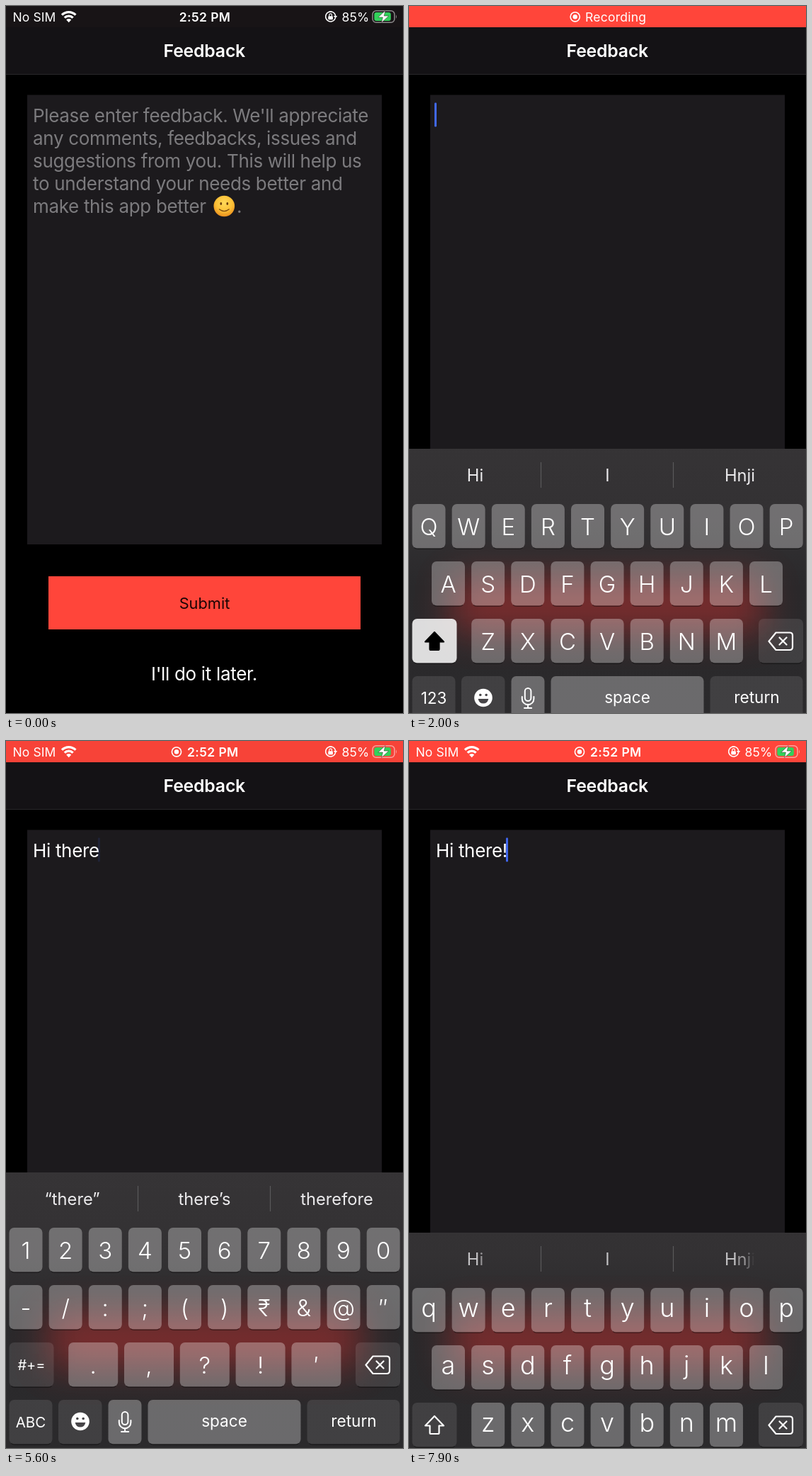
Recreate the animation shown at these times as an HTML page. Size 561 px wide and 998 px high, loop 8 s.

```html
<!DOCTYPE html>
<html lang="en">
<head>
<meta charset="utf-8">
<title>Feedback form</title>
<style>
html, body { margin: 0; width: 100%; height: 100%; overflow: hidden; background: #000; }
svg { display: block; width: 100vw; height: 100vh; }
text { font-family: Inter, Roboto, "Liberation Sans", sans-serif; fill: #fff; white-space: pre; }
.body { font-size: 26px; letter-spacing: -.33px; }
.hint { fill: #7c7b7e; }
.mid { text-anchor: middle; }
.status { font-size: 17.5px; letter-spacing: .1px; }
.bold { font-weight: 600; }
.clock { letter-spacing: .4px; }
.line { fill: none; stroke: #fff; stroke-linecap: round; stroke-linejoin: round; }
.item { transform-box: fill-box; transform-origin: center; }
</style>
</head>
<body>
<svg viewBox="0 0 561 998" preserveAspectRatio="none">
  <defs>
    <linearGradient id="base" gradientUnits="userSpaceOnUse" x1="0" y1="600" x2="0" y2="998">
      <stop offset="0" stop-color="#363436"/>
      <stop offset=".32" stop-color="#333133"/>
      <stop offset=".55" stop-color="#2a292b"/>
      <stop offset="1" stop-color="#2b2a2c"/>
    </linearGradient>
    <radialGradient id="smile" cx=".5" cy=".35" r=".65">
      <stop offset="0" stop-color="#ffd95a"/>
      <stop offset=".6" stop-color="#fbc036"/>
      <stop offset="1" stop-color="#ea8f1e"/>
    </radialGradient>
    <filter id="blur" x="-40%" y="-200%" width="180%" height="500%"><feGaussianBlur stdDeviation="26"/></filter>
    <clipPath id="boardClip"><rect id="boardEdge" width="561" height="998"/></clipPath>
  </defs>

  <rect width="561" height="998"/>
  <rect width="561" height="96" fill="#141215"/>
  <rect width="561" height="30" fill="#181416"/>
  <rect y="96" width="561" height="1" fill="#29282b"/>
  <text class="mid bold" x="280.3" y="71.5" font-size="24.8" letter-spacing="-.2">Feedback</text>

  <rect x="30" y="125.5" width="501" height="634.5" fill="#1c1a1d"/>
  <g id="hint">
    <g id="hintLines"></g>
    <circle cx="308.3" cy="282.5" r="14.8" fill="url(#smile)"/>
    <ellipse cx="303.8" cy="279" rx="1.4" ry="2.1" fill="#6b3d0c"/>
    <ellipse cx="312.8" cy="279" rx="1.4" ry="2.1" fill="#6b3d0c"/>
    <path d="M301.5 287q6.8 5.2 13.6 0" fill="none" stroke="#7a4810" stroke-width="1.4" stroke-linecap="round"/>
  </g>
  <text id="typed" class="body" x="38" y="164"></text>
  <rect id="caret" y="136.5" width="3" height="34" rx="1.2" fill="#4168f2"/>

  <rect x="60" y="805" width="441" height="75" fill="#ff453a"/>
  <text class="mid" x="280.5" y="851" font-size="21.8" style="fill:#1a0404">Submit</text>
  <text class="body mid" x="280" y="952">I'll do it later.</text>

  <g id="keyboard">
    <g clip-path="url(#boardClip)">
      <rect y="600" width="561" height="398" fill="url(#base)"/>
      <rect x="60" y="808" width="441" height="75" fill="#ff3230" opacity=".39" filter="url(#blur)"/>
    </g>
    <g id="board"></g>
  </g>

  <rect id="alert" width="561" height="30" fill="#ff453a"/>
  <g id="recIcon">
    <circle cy="15.3" r="6.6" class="line" stroke-width="1.6"/>
    <circle cy="15.3" r="3.2" fill="#fff"/>
  </g>
  <text id="recText" class="status" y="21.7" style="letter-spacing:.25px">Recording</text>
  <text id="clock" class="status bold mid clock" y="21.7">2:52 PM</text>
  <g id="sides">
    <text class="status item" x="9.5" y="21.7">No SIM</text>
    <g class="item">
      <path class="line" style="stroke-linecap:butt" stroke-width="3.3" d="M79 12.7A13.6 13.6 0 0 1 98.4 12.7M82.8 16.6A8.2 8.2 0 0 1 94.6 16.6"/>
      <path fill="#fff" d="M88.7 23.2L85.2 19.4A5 5 0 0 1 92.2 19.4Z"/>
    </g>
    <g class="item">
      <path class="line" stroke-width="1.5" d="M465.2 17.5A7 7 0 1 1 465.6 13.8"/>
      <path fill="#fff" d="M462.8 14H468.2L465.5 17.6Z"/>
      <rect x="455.3" y="14.2" width="6.6" height="5" rx="1" fill="#fff"/>
      <path class="line" stroke-width="1.2" d="M456.8 14V12.6A1.8 1.8 0 0 1 460.4 12.6V14"/>
    </g>
    <text class="status item" x="474.5" y="21.7">85%</text>
    <g class="item">
      <rect x="518" y="6.7" width="31" height="16.6" rx="5" fill="none" stroke="#fff" stroke-opacity=".5" stroke-width="1.5"/>
      <path d="M551 12.2Q553 15 551 17.8Z" fill="#fff" opacity=".5"/>
      <rect x="520.3" y="9" width="23.5" height="12" rx="3" fill="#32d15b"/>
      <path d="M536 6.5L525.8 16H532.4L530.6 23.5L540.8 14H534.2Z" fill="#fff" stroke="#2a1a1a" stroke-opacity=".6" stroke-width=".8"/>
    </g>
  </g>
</svg>

<script>
const LOOP = 8000, TRAVEL = 389, TOP = 609;
const SHOW = 1727, HIDE = 7853;
const $ = id => document.getElementById(id);
const clamp = v => Math.min(1, Math.max(0, v));
const ramp = (t, a, b) => clamp((t - a) / (b - a));
const smooth = (t, a, b) => { const u = ramp(t, a, b); return u * u * (3 - 2 * u); };
const attr = (el, values) => { for (const k in values) el.setAttribute(k, values[k]); };

// [press time, release time, key]
const presses = [
  [2400, 2490, 'H'], [2750, 2830, 'i'], [3410, 3500, ' '],
  [3780, 3870, 't'], [4040, 4130, 'h'], [4270, 4360, 'e'],
  [4560, 4670, 'r'], [4880, 4970, 'e'],
  [5480, 5560, '123'], [5810, 5905, '!'], [7100, 7180, 'ABC']
];
// [time, three suggestions]
const suggestions = [
  [0, 'Hi', 'I', 'Hnji'], [2490, '“H”', 'Hi', 'He'], [2830, '“Hi”', 'His', 'Hij'],
  [3500, 'there', 'I', 'how'], [3870, '“t”', 'the', 'to'], [4130, '“th”', 'the', 'that'],
  [4360, '“the”', 'there', 'there’s'], [4670, '“ther”', 'there', 'there’s'],
  [4970, '“there”', 'there’s', 'therefore'], [5905, 'Hi', 'I', 'Hnji'], [7830, 'Hi', 'I', 'Hnji']
];

const hints = ["Please enter feedback. We'll appreciate", 'any comments, feedbacks, issues and',
  'suggestions from you. This will help us', 'to understand your needs better and', 'make this app better'];
$('hintLines').innerHTML = hints.map((s, i) =>
  `<text class="body hint" x="38" y="${164 + 32 * i}">${s}</text>`).join('') +
  '<text class="body hint" x="326" y="292">.</text>';

// Keyboard: y is measured from the top edge of the keyboard
const keys = {};
const label = (x, y, size, s, extra = '') =>
  `<text class="mid" x="${x}" y="${y}" font-size="${size}" ${extra}>${s}</text>`;
const cap = (x, y, w, shade = .3, id = '') =>
  `<rect ${id && `id="${id}"`} x="${x}" y="${y}" width="${w}" height="62.5" rx="7" fill="#fff" fill-opacity="${shade}"/>` +
  `<path d="M${x + 3} ${y + 61.5}q2 1.7 5 1.7h${w - 16}q3 0 5-1.7" fill="none" stroke="#000" stroke-opacity=".4" stroke-width="1.5"/>`;
const escapeChar = c => c === '&' ? '&amp;' : c;

function row(chars, x, y, plane, w = 47, step = 56.13) {
  return [...chars].map((c, i) => {
    const kx = x + i * step, small = plane === 'lower';
    keys[plane + c] = { x: kx, y, w };
    return cap(kx, y, w) + label(kx + w / 2, y + (small ? 41 : 43.7), small ? 36 : 33, escapeChar(c), 'font-weight="360"');
  }).join('');
}

const arrow = (fill, stroke) =>
  `<path d="M36 259L49 272.5H42.5V282.5Q42.5 284 41 284H31Q29.5 284 29.5 282.5V272.5H23Z"
   fill="${fill}" stroke="${stroke}" stroke-width="2.2" stroke-linejoin="round"/>`;
const letters = (plane, rows, shift) => `<g id="${plane}">` +
  row(rows[0], 4.5, 78, plane) + row(rows[1], 32, 159, plane) + row(rows[2], 88.2, 240, plane) + shift + '</g>';

$('board').innerHTML =
  '<path d="M186.5 19v36M373.5 19v36" stroke="#5a595b" stroke-width="1.2"/>' +
  [93.5, 280.5, 467.5].map((x, i) => label(x, 46, 23.7, '', `id="word${i}" style="fill:#ecebed"`)).join('') +
  letters('upper', ['QWERTYUIOP', 'ASDFGHJKL', 'ZXCVBNM'], cap(4.5, 240, 63, .84) + arrow('#000', '#000')) +
  letters('lower', ['qwertyuiop', 'asdfghjkl', 'zxcvbnm'], cap(4.5, 240, 63, .1) + arrow('none', '#fff')) +
  '<g id="digits">' + row('1234567890', 4.5, 78, 'digits') + row('-/:;()₹&@″', 4.5, 159, 'digits') +
  row('.,?!′', 88.2, 240, 'digits', 70, 78.8) + cap(4.5, 240, 63, .1) + label(36, 279, 20, '#+=') + '</g>' +
  cap(494, 240, 63, .1) +
  '<path class="line" stroke-width="2.2" d="M518.5 259.5H538Q542 259.5 542 263.5V280Q542 284 538 284H518.5L508.5 271.8ZM523.5 266.5l10 10m0-10l-10 10"/>' +
  cap(4.5, 321, 61, .1, 'modeKey') + label(35, 360, 22.4, '', 'id="mode"') +
  cap(74, 321, 61.5, .1) +
  '<circle cx="105" cy="351.5" r="12.8" fill="#fff"/><g fill="#474548"><circle cx="100.8" cy="347.5" r="1.8"/>' +
  '<circle cx="109.2" cy="347.5" r="1.8"/><path d="M97.7 353H112.3Q111 359.6 105 359.6T97.7 353Z"/></g>' +
  cap(144.5, 321, 47) +
  '<rect class="line" stroke-width="2" x="163.8" y="338" width="8.6" height="18" rx="4.3"/>' +
  '<path class="line" stroke-width="2" d="M159.8 350V353A8.3 8.3 0 0 0 176.4 353V350M168.1 361.5V366M163 366H173.2"/>' +
  cap(200.5, 321, 216, .3, 'spaceKey') + label(308.5, 359, 22.6, 'space') +
  cap(425.5, 321, 131, .1) + label(491.5, 359, 22.6, 'return') +
  '<g id="popup"><path fill="#6d6c6f"/>' + label(0, 0, 54, '', 'font-weight="300"') + '</g>';

const [popShape, popText] = $('popup').children;

function bubble({ x, y, w }) {
  const l = x - 19.5, r = x + w + 19.5, top = y - 97;
  return `M${l + 13} ${top}H${r - 13}Q${r} ${top} ${r} ${top + 13}V${y - 36}` +
    `C${r} ${y - 16} ${x + w} ${y - 20} ${x + w} ${y + 4}V${y + 56}q0 7-7 7H${x + 7}q-7 0-7-7V${y + 4}` +
    `C${x} ${y - 20} ${l} ${y - 16} ${l} ${y - 36}V${top + 13}Q${l} ${top} ${l + 13} ${top}Z`;
}

// Critically damped spring, 1 falling to 0
const settle = ms => { const u = Math.max(0, ms) * .0183; return (1 + u) * Math.exp(-u); };

function drawStatus(t) {
  const red = smooth(t, 600, 1050);
  const back = smooth(t, 3050, 3400), sides = ramp(t, 3200, 3500);
  const pulse = t > 1950 ? (1 - Math.cos((t - 1950) / 1975 * 2 * Math.PI)) / 2 : 0;
  const sideLevel = t < 2000 ? 1 - red : sides;
  attr($('alert'), { opacity: red * (1 - .165 * pulse) });
  attr($('recIcon'), { opacity: red, transform: `translate(${234.7 + 6.3 * back})` });
  attr($('recText'), { x: 249 + 6 * back, opacity: red * (1 - back) });
  attr($('clock'), { x: t < 2000 ? 281 : 286 + 6.3 * back, opacity: t < 2000 ? 1 - red : back });
  attr($('sides'), { opacity: sideLevel });
  document.querySelectorAll('.item').forEach(el => el.style.transform = `scale(${.72 + .28 * sideLevel})`);
}

function drawWords(t) {
  const [start, ...words] = suggestions.filter(s => s[0] <= t).pop();
  words.forEach((word, i) => {
    $('word' + i).innerHTML = [...word].map((c, k) =>
      `<tspan fill-opacity="${clamp((t - start - k * 22) / 90).toFixed(2)}">${c}</tspan>`).join('');
  });
}

function drawKeyboard(t) {
  const drop = TRAVEL * (t < HIDE ? (t < SHOW ? 1 : settle(t - SHOW)) : 1 - settle(t - HIDE));
  const y = Math.round(TOP + drop);
  attr($('keyboard'), { display: t < SHOW ? 'none' : 'inline' });
  attr($('boardEdge'), { y });
  attr($('board'), { transform: `translate(0 ${y})` });

  const plane = t < 2490 ? 'upper' : t >= 5560 && t < 7180 ? 'digits' : 'lower';
  for (const id of ['upper', 'lower', 'digits']) attr($(id), { display: id === plane ? 'inline' : 'none' });
  $('mode').textContent = plane === 'digits' ? 'ABC' : '123';
  attr($('mode'), { 'font-size': plane === 'digits' ? 20.5 : 22.4 });

  const press = presses.find(p => p[0] <= t && t < p[1]);
  const char = press ? press[2] : '';
  const key = keys[plane + char];
  attr($('spaceKey'), { 'fill-opacity': char === ' ' ? .1 : .3 });
  attr($('modeKey'), { 'fill-opacity': char.length > 1 ? .3 : .1 });
  attr($('popup'), { display: key ? 'inline' : 'none' });
  if (key) {
    attr(popShape, { d: bubble(key) });
    attr(popText, { x: key.x + key.w / 2, y: key.y - 35 });
    popText.textContent = char;
  }
  drawWords(t);
}

function drawField(t) {
  const done = presses.filter(p => p[1] <= t && p[2].length === 1);
  const typed = $('typed');
  typed.textContent = done.map(p => p[2]).join('');
  const phase = (t - (done.length ? done[done.length - 1][1] : SHOW)) % 1000;
  const glow = phase < 500 ? 1 : Math.max(1 - ramp(phase, 500, 650), ramp(phase, 850, 1000));
  const width = done.length ? typed.getComputedTextLength() : 0;
  attr($('caret'), { x: 36 + width, opacity: t < SHOW ? 0 : glow });
  attr($('hint'), { display: t < SHOW ? 'inline' : 'none' });
}

function draw(now) {
  const t = now % LOOP;
  drawStatus(t);
  drawField(t);
  drawKeyboard(t);
}

const begin = performance.now();
function tick() {
  draw(performance.now() - begin);
  requestAnimationFrame(tick);
}
tick();
</script>
</body>
</html>
```
